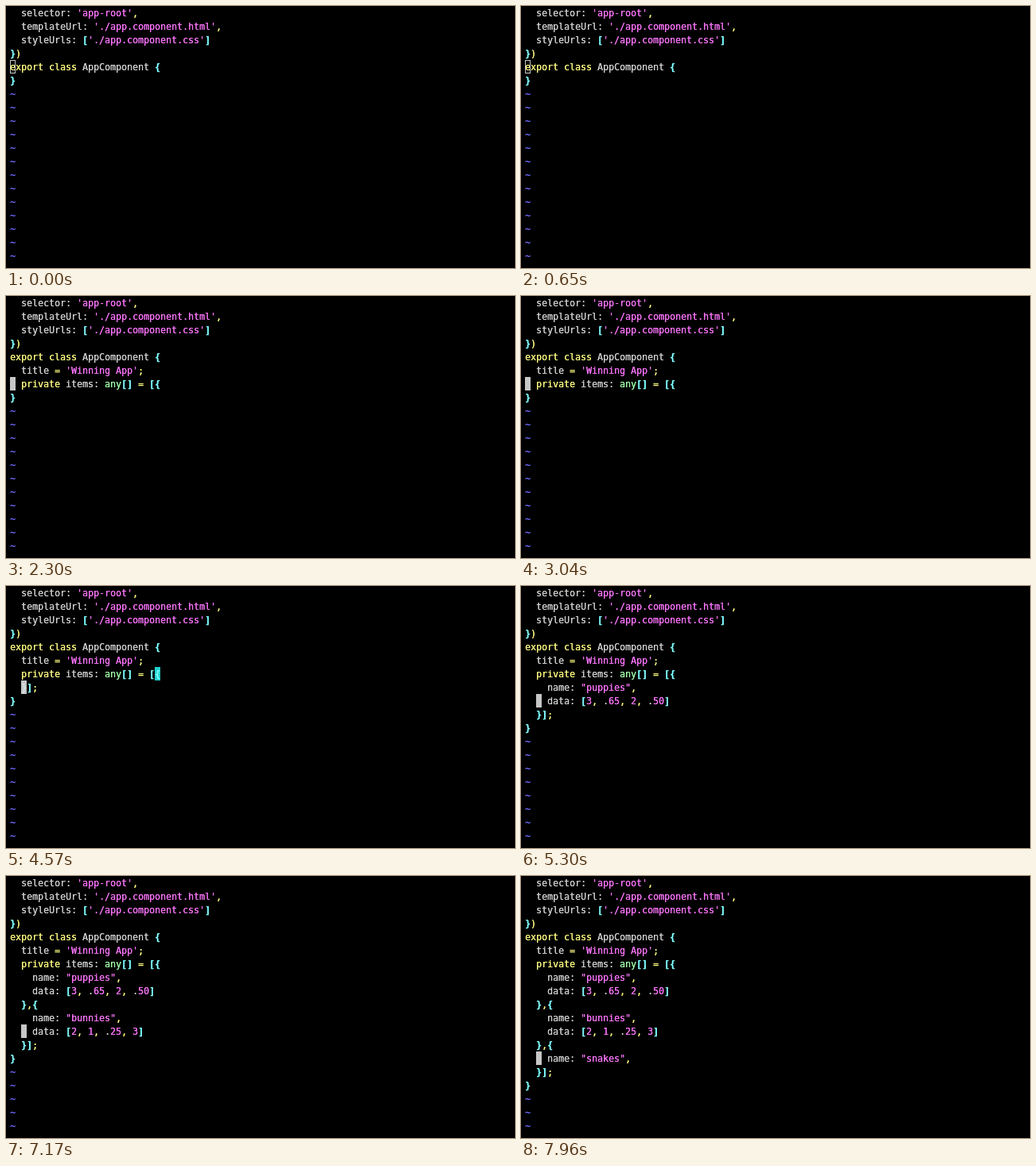
An HTML page with a canvas for the animation above (8 s loop, 640 by 330 pixels).

```html
<!DOCTYPE html>
<html lang="en">
<head>
<meta charset="utf-8">
<title>Editor session</title>
<style>
  html, body { margin: 0; width: 100%; height: 100%; overflow: hidden; background: #000; }
  canvas { display: block; width: 640px; height: 330px; }
</style>
</head>
<body>
<canvas id="stage" width="640" height="330"></canvas>
<script>
const ctx = document.getElementById('stage').getContext('2d');
const LOOP = 8000;
const CELL_W = 7, CELL_H = 17, LEFT = 5, BASE = 13, ROWS = 19;
const FONT = '11.63px "DejaVu Sans Mono", monospace';
const GREY = '#cfcfcf', YELLOW = '#fffc80', PINK = '#f873f8',
      CYAN = '#7dfdff', GREEN = '#a0ffa8', BLUE = '#6f6bff',
      BLOCK = '#c7c7c7', MATCH = '#1fd0cc';

const START = [
  "  selector: 'app-root',",
  "  templateUrl: './app.component.html',",
  "  styleUrls: ['./app.component.css']",
  "})",
  "export class AppComponent {",
  "}"
];

// Each edit inserts one whole line: time, row, text.
const EDITS = [
  [740, 5, "  title = 'Winning App';"],
  [2220, 6, "  private items: any[] = [{"],
  [3780, 7, "  }];"],
  [4700, 7, '    name: "puppies",'],
  [5200, 8, "    data: [3, .65, 2, .50]"],
  [5700, 9, "  },{"],
  [6200, 10, '    name: "bunnies",'],
  [6700, 11, "    data: [2, 1, .25, 3]"],
  [7200, 12, "  },{"],
  [7620, 13, '    name: "snakes",']
];

const TOKEN = /('[^']*'|"[^"]*"|\d+)|(\b(?:export|class|private)\b|[=,;)])|(\bany\b)|([\[\]{}])|(~)|([^\s])/g;
const COLORS = [PINK, YELLOW, GREEN, CYAN, BLUE, GREY];

const cellX = col => LEFT + col * CELL_W;

// Every glyph is drawn twice, slightly apart, for a heavier stroke.
function drawText(text, row, col, color) {
  const y = row * CELL_H + BASE;
  ctx.fillStyle = color;
  ctx.font = (color === CYAN ? 'bold ' : '') + FONT;
  [...text].forEach((ch, i) => {
    const x = cellX(col + i);
    ctx.fillText(ch, x, y);
    ctx.fillText(ch, x + 0.3, y);
  });
}

function drawLine(line, row) {
  for (const m of line.matchAll(TOKEN)) {
    drawText(m[0], row, m.index, COLORS[m.slice(1).findIndex(Boolean)]);
  }
}

function fillCell(row, col, color) {
  ctx.fillStyle = color;
  ctx.fillRect(cellX(col), row * CELL_H, CELL_W, CELL_H);
}

function drawMatch(lines, row) {
  let open = row - 1;
  while (!lines[open].endsWith('{')) open--;
  const col = lines[open].length - 1;
  fillCell(open, col, MATCH);
  drawText('{', open, col, CYAN);
}

function drawCursor(lines, edit) {
  if (!edit) {
    ctx.strokeStyle = BLOCK;
    ctx.lineWidth = 1;
    ctx.strokeRect(LEFT + 0.5, 4 * CELL_H + 0.5, CELL_W - 1, CELL_H - 1);
    return;
  }
  const [, row, text] = edit;
  const indent = text.search(/\S/);
  const onBrace = text[indent] === '}';
  const col = onBrace ? indent : indent - 2;
  fillCell(row, col, BLOCK);
  if (onBrace) {
    drawText('}', row, col, '#d5e8e8');
    drawMatch(lines, row);
  }
}

function render(t) {
  const lines = START.slice();
  const done = EDITS.filter(([at]) => at <= t);
  for (const [, row, text] of done) lines.splice(row, 0, text);

  ctx.fillStyle = '#000';
  ctx.fillRect(0, 0, 640, 330);
  for (let row = 0; row < ROWS; row++) drawLine(lines[row] ?? '~', row);
  drawCursor(lines, done[done.length - 1]);
}

const begin = performance.now();
function tick() {
  render((performance.now() - begin) % LOOP);
  requestAnimationFrame(tick);
}
tick();
</script>
</body>
</html>
```
